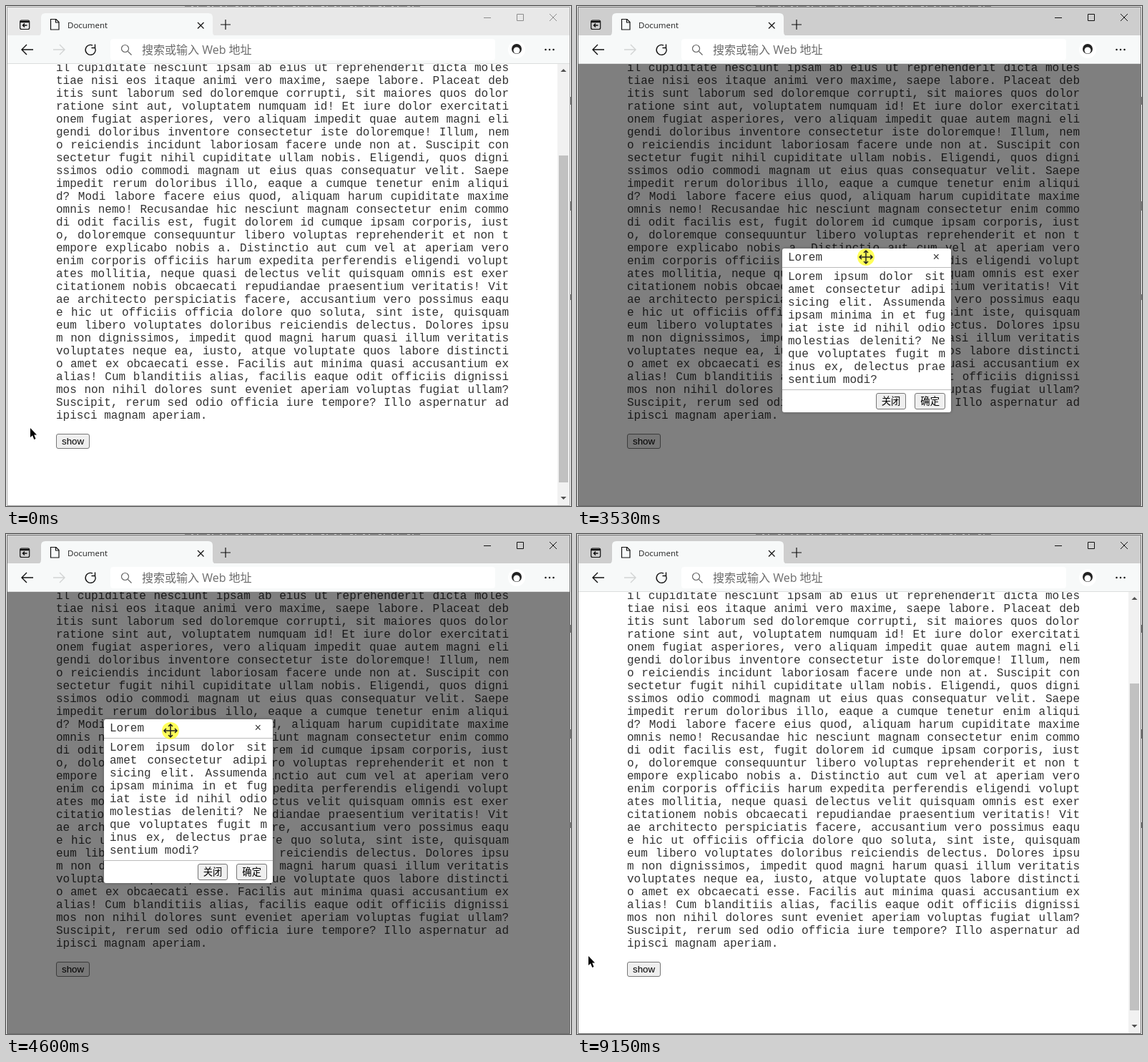
Recreate the animation shown at these times as an HTML page. Size 790 px wide and 699 px high, loop 9.3 s.

```html
<!DOCTYPE html>
<html lang="zh-CN">
<head>
<meta charset="utf-8">
<title>Document</title>
<style>
html, body { margin: 0; width: 100%; height: 100%; overflow: hidden; background: #fff; }
body { position: relative; }
svg, div { position: absolute; box-sizing: border-box; }
#frame, #pointer { left: 0; top: 0; }
#frame { --bar: #e8e8e8; --edge: #a4a4a4; --cap: #8c8c8c; }
#frame.active { --bar: #cecece; --edge: #6e6e6e; --cap: #111; }
#frame text { font-family: "Open Sans", "Noto Sans CJK SC", sans-serif; }
#page { left: 2px; top: 81px; width: 786px; height: 617px; overflow: hidden; background: #fff; }
#page, .box { font: 16px/18px "Liberation Mono", "Noto Sans CJK SC", monospace; color: #333; }
#text { left: 68px; top: -3px; width: 633px; white-space: pre-line; text-align: justify; text-align-last: justify; }
#tail { left: 68px; top: 483px; }
.btn {
  display: inline-block; box-sizing: border-box; padding: 0 7px; height: 23px;
  border: 1px solid #767676; border-radius: 3px; background: #efefef; color: #000;
  font: 13.333px/21px "Liberation Sans", "Noto Sans CJK SC", sans-serif;
}
.btn.hover { background: #e5e5e5; border-color: #4f4f4f; }
#show { position: absolute; left: 68px; top: 517px; height: 21px; line-height: 19px; }
#shade { inset: 0; background: rgba(0, 0, 0, .5); }
.box { left: 0; top: 0; width: 236px; background: #fff; border-radius: 3px; box-shadow: 0 0 4px rgba(0, 0, 0, .3); }
.box > div { position: relative; padding: 4px 8px; }
.box .head { border-bottom: 1px solid #bbb; }
.box .main { white-space: pre-line; text-align: justify; text-align-last: justify; }
.box .main span { display: block; text-align-last: left; }
.box .foot { display: flex; justify-content: flex-end; gap: 12px; border-top: 1px solid #bbb; }
.box i { position: absolute; right: 16px; font-style: normal; }
#dialog { height: 229px; }
#alert { height: 140px; line-height: 22px; }
</style>
</head>
<body>
<svg id="frame" width="790" height="699" fill="none" stroke="#111" stroke-width="1.2">
  <g stroke="none">
    <path d="M0 0H790V1H0Z" fill="#e4e4e4"/>
    <path d="M1 1H789V42H1Z" fill="var(--bar)"/>
    <path d="M2 41H788V81H2Z" fill="#f7f9f9"/>
    <path d="M43 42Q49 42 49 36V16Q49 10 55 10H283Q289 10 289 16V36Q289 42 295 42Z" fill="#f7f9f9"/>
    <path d="M2 80H788V81H2Z" fill="#dcdedd"/>
    <rect x="146" y="46" width="538" height="30" rx="4" fill="#fff"/>
    <text x="86" y="30.5" font-size="11.5" fill="#222">Document</text>
    <text x="190" y="67" font-size="16" fill="#6b6b6b">搜索或输入 Web 地址</text>
    <circle cx="714" cy="61" r="12" fill="#fff"/>
    <circle cx="714" cy="60" r="7" fill="#222"/>
    <circle cx="714" cy="62" r="4.5" fill="#fff"/>
  </g>
  <path d="M250 .5H580" stroke="#999" stroke-width="1" stroke-dasharray="9 3 5 2 12 4 3 2"/>
  <path d="M789.5 127v11m0 135v13m0 117v8" stroke="#777" stroke-width="1"/>
  <path d="M754.5 61h.01m5.5 0h.01m5.5 0h.01" stroke-width="2.5" stroke-linecap="round"/>
  <rect x="19.7" y="20" width="13" height="12.5" rx="2"/>
  <path d="M20 22H32" stroke-width="2.5"/>
  <path d="M29.5 27H23.5M26 24.5L23.5 27L26 29.5" stroke-width="1.5"/>
  <path d="M64.5 18.5H70L74 22.5V33H62.5V18.5ZM69.500 18.500V23H74"/>
  <path d="M268 23L276.5 31.5M276.5 23L268 31.5M300 26H314M307 19V33"/>
  <path d="M22 61H38M29 54L22 61L29 68" stroke-width="1.4"/>
  <path d="M66 61H82M75 54L82 61L75 68" stroke="#d2d4d4" stroke-width="1.4"/>
  <path d="M124.5 58.5A7 7 0 1 1 121 55M124.5 53.5V58.5H119.5" stroke-width="1.4"/>
  <path d="M170.5 63.5L175.5 68.5" stroke="#666"/>
  <circle cx="166.5" cy="59.5" r="5" stroke="#666"/>
  <path d="M668 16.5H678M714.5 11.5H723.5V20.5H714.5ZM760 11L770 21M770 11L760 21" stroke="var(--cap)" stroke-width="1"/>
  <path d="M1.5 1.5H788.5V698.5H1.5Z" stroke="var(--edge)" stroke-width="1"/>
</svg>

<div id="page">
<div id="text">il cupiditate nesciunt ipsam ab eius ut reprehenderit dicta moles
tiae nisi eos itaque animi vero maxime, saepe labore. Placeat deb
itis sunt laborum sed doloremque corrupti, sit maiores quos dolor
ratione sint aut, voluptatem numquam id! Et iure dolor exercitati
onem fugiat asperiores, vero aliquam impedit quae autem magni eli
gendi doloribus inventore consectetur iste doloremque! Illum, nem
o reiciendis incidunt laboriosam facere unde non at. Suscipit con
sectetur fugit nihil cupiditate ullam nobis. Eligendi, quos digni
ssimos odio commodi magnam ut eius quas consequatur velit. Saepe
impedit rerum doloribus illo, eaque a cumque tenetur enim aliqui
d? Modi labore facere eius quod, aliquam harum cupiditate maxime
omnis nemo! Recusandae hic nesciunt magnam consectetur enim commo
di odit facilis est, fugit dolorem id cumque ipsam corporis, iust
o, doloremque consequuntur libero voluptas reprehenderit et non t
empore explicabo nobis a. Distinctio aut cum vel at aperiam vero
enim corporis officiis harum expedita perferendis eligendi volupt
ates mollitia, neque quasi delectus velit quisquam omnis est exer
citationem nobis obcaecati repudiandae praesentium veritatis! Vit
ae architecto perspiciatis facere, accusantium vero possimus eaqu
e hic ut officiis officia dolore quo soluta, sint iste, quisquam
eum libero voluptates doloribus reiciendis delectus. Dolores ipsu
m non dignissimos, impedit quod magni harum quasi illum veritatis
voluptates neque ea, iusto, atque voluptate quos labore distincti
o amet ex obcaecati esse. Facilis aut minima quasi accusantium ex
alias! Cum blanditiis alias, facilis eaque odit officiis dignissi
mos non nihil dolores sunt eveniet aperiam voluptas fugiat ullam?
Suscipit, rerum sed odio officia iure tempore? Illo aspernatur ad</div>
<div id="tail">ipisci magnam aperiam.</div>
<span id="show" class="btn">show</span>
<svg id="scroll" width="17" height="617" style="left:769px;top:0">
  <path d="M0 0H17V617H0Z" fill="#f1f1f1"/>
  <path d="M2 128H15V585H2Z" fill="#c1c1c1"/>
  <path d="M4.5 11L8.5 7L12.5 11ZM4.5 605L8.5 609L12.5 605Z" fill="#505050"/>
</svg>
<div id="shade"></div>
</div>

<div id="dialog" class="box">
<div class="head">Lorem<i>×</i></div>
<div class="main">Lorem ipsum dolor sit
amet consectetur adipi
sicing elit. Assumenda
ipsam minima in et fug
iat iste id nihil odio
molestias deleniti? Ne
que voluptates fugit m
inus ex, delectus prae
<span>sentium modi?</span></div>
<div class="foot"><span id="close" class="btn">关闭</span><span class="btn">确定</span></div>
</div>

<div id="alert" class="box">
<div class="head">提示<i>×</i></div>
<div>已关闭!</div>
</div>

<svg id="pointer" width="790" height="699">
  <g id="hot">
    <circle id="glow" r="12" fill="#ff0" fill-opacity=".65"/>
    <path id="arrow" d="M0 0V13L3 10.3L5.3 16L7.5 15L5.2 9.6H9Z"/>
    <path id="move" d="M-9 0H9M0 -9V9M-6 -3L-9 0L-6 3M6 -3L9 0L6 3M-3 -6L0 -9L3 -6M-3 6L0 9L3 6" fill="none" stroke="#222" stroke-width="1.5"/>
    <path id="beam" d="M-3 -8.5H3M-3 8.5H3M0 -8.5V8.5" stroke="#000"/>
    <path id="hand" d="M1 1Q2.5 -1 4 1V8L9 9Q11 10 11 12V15L9 20H2L-4 13Q-4 10 -1 11L1 13Z" fill="#fff" stroke="#000" stroke-width="1.2"/>
  </g>
</svg>

<script>
const LOOP = 9300, STEP = 76.6, GRAB = 2842, DRAG_STEPS = 27;
const $ = id => document.getElementById(id);
const show = (id, on) => $(id).style.display = on ? '' : 'none';
const within = (t, a, b) => t >= a && t < b;
const mix = (a, b, u) => a + (b - a) * u;
const smooth = u => u * u * (3 - 2 * u);
const place = (el, [x, y]) => el.style.transform = `translate(${Math.round(x)}px,${Math.round(y)}px)`;

// Pointer moves: start, end, x, y
const moves = [
  [320, 900, 84, 611], [1460, 2460, 372, 308], [2460, 2770, 370, 291], [2770, 4910, 361, 255],
  [5320, 6000, 424, 448], [6400, 7010, 488, 331], [7670, 8430, 8, 588], [8500, 9120, 16, 590]
];

function roam(t) {
  return moves.reduce(([px, py], [a, b, x, y]) => {
    const u = smooth(Math.min(1, Math.max(0, (t - a) / (b - a))));
    return [mix(px, x, u), mix(py, y, u)];
  }, [34, 590]);
}

// The box circles on a changing ellipse: step, centre x, y, radius x, y
const orbit = [
  [0, 277, 275, 0, 0], [3, 238, 239, 104, 63], [7, 238, 239, 104, 63], [9, 287, 248, 150, 91],
  [14, 311, 262, 163, 89], [23, 237, 259, 100, 30], [DRAG_STEPS, 268, 239, 0, 0]
];

function drag(step) {
  const s = Math.min(DRAG_STEPS, Math.max(0, step));
  const i = Math.max(1, orbit.findIndex(k => k[0] >= s));
  const from = orbit[i - 1], to = orbit[i];
  const u = (s - from[0]) / (to[0] - from[0]);
  const [, cx, cy, rx, ry] = from.map((v, n) => mix(v, to[n], u));
  const angle = (s - 11) * Math.PI / 4;
  const box = [cx + rx * Math.cos(angle), cy - ry * Math.sin(angle)];
  // the pointer runs ahead while sweeping right
  const lead = .16 * rx * Math.max(0, -Math.sin(angle));
  return { box, grip: [box[0] + 92.5 + lead, box[1] + 16 - lead / 6] };
}

function cursorAt([x, y], box, isAlert) {
  const rx = x - box[0], ry = y - box[1];
  if (rx < 0 || rx > 236 || ry < 0) return 'arrow';
  if (isAlert) return ry > 31 ? 'arrow' : rx > 204 ? 'hand' : 'move';
  return ry < 27 ? 'move' : ry < 197 ? 'beam' : 'arrow';
}

function draw(now) {
  const t = now % LOOP;
  const step = Math.floor((t + 8 - GRAB) / STEP);
  const dialogOn = within(t, 1220, 6470), alertOn = within(t, 6470, 7470), open = dialogOn || alertOn;
  const { box, grip } = drag(step);
  const home = [277, 319];
  const spot = within(step, 0, DRAG_STEPS + 1) ? grip : roam(GRAB + step * STEP);

  $('frame').classList.toggle('active', t >= 1050);
  $('show').classList.toggle('hover', within(t, 800, 1220));
  $('close').classList.toggle('hover', within(t, 5950, 6470));
  show('shade', open);
  show('scroll', !open);
  show('dialog', dialogOn);
  show('alert', alertOn);
  place($('dialog'), box);
  place($('alert'), home);

  const shape = open ? cursorAt(spot, alertOn ? home : box, alertOn) : 'arrow';
  for (const id of ['arrow', 'move', 'beam', 'hand']) show(id, id === shape);
  show('glow', [[1050, 1220], [2835, 5140], [6320, 6470], [7390, 7470]].some(([a, b]) => within(t, a, b)));
  place($('hot'), spot);
}

const start = performance.now();
(function tick() {
  draw(performance.now() - start);
  requestAnimationFrame(tick);
})();
</script>
</body>
</html>
```
